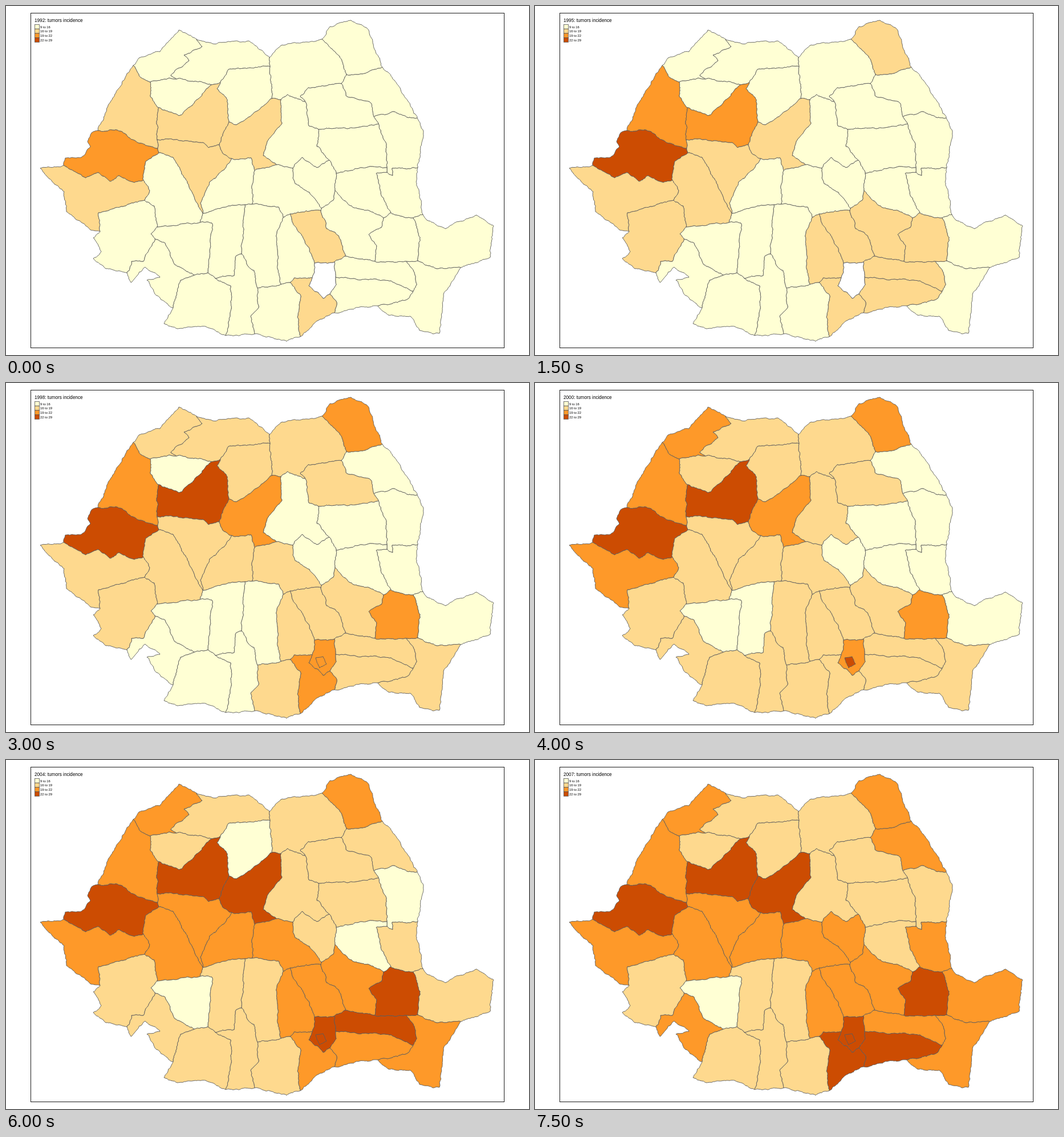
These frames come from a looping animation (917 px wide and 611 px high, 8 s). An HTML page:

```html
<!DOCTYPE html>
<html lang="en">
<head>
<meta charset="utf-8">
<title>Tumors incidence by county</title>
<style>
html, body { margin: 0; width: 100%; height: 100%; overflow: hidden; background: #fff; }
svg { display: block; width: 917px; height: 611px; }
text { font-family: "Liberation Sans", Arial, sans-serif; }
polygon { stroke: #5c5c5c; stroke-width: .9; stroke-linejoin: round; }
</style>
</head>
<body>
<svg id="map" viewBox="0 0 917 611"></svg>
<script>
const COLORS = ['#ffffd4', '#fed98e', '#fe9929', '#cc4c02'];
const LABELS = ['9 to 16', '16 to 19', '19 to 22', '22 to 29'];

// Points where counties meet; "-" is the outside.
// Two counties that share two junctions have a border between them.
const JUNCTIONS = {
  'AR TM -': '101 279', 'AR BH -': '161 218', 'BH SM -': '223 104', 'MM SM -': '334 58',
  'MM SV -': '462 90', 'BT SV -': '554 58', 'BT IS -': '660 107', 'IS VS -': '721 196',
  'GL VS -': '722 283', 'GL TL -': '731 365', 'CT TL -': '797 458', 'CL CT -': '652 525',
  'CL GR -': '576 537', 'GR TR -': '516 579', 'OT TR -': '436 574', 'DJ OT -': '385 577',
  'DJ MH -': '293 528', 'CS MH -': '212 467', 'CS TM -': '165 395',
  'BH SJ SM': '253 133', 'BH CJ SJ': '268 178', 'AB BH CJ': '265 234', 'AB AR BH': '266 249',
  'MM SJ SM': '299 128', 'CJ MM SJ': '360 138', 'BN CJ MM': '376 133', 'BN MM SV': '463 106',
  'BT IS SV': '597 120', 'IS NT SV': '588 136', 'IS NT VS': '645 194', 'BC NT VS': '653 206',
  'HR NT SV': '525 168', 'BC HR NT': '548 216', 'HR MS SV': '482 164', 'BN MS SV': '466 162',
  'BN CJ MS': '391 203', 'AB CJ MS': '374 243', 'AB MS SB': '396 267', 'BV MS SB': '436 288',
  'BV HR MS': '474 278', 'BV CV HR': '503 284', 'BC CV HR': '567 270', 'BC CV VN': '579 293',
  'BC VN VS': '668 283', 'GL VN VS': '668 291', 'BZ CV VN': '577 323', 'BV BZ CV': '553 354',
  'BV BZ PH': '552 358', 'BV DB PH': '498 364', 'AG BV DB': '486 370', 'AG BV SB': '432 347',
  'AG SB VL': '419 348', 'AB HD SB VL': '345 363', 'GJ HD VL': '340 379', 'CS GJ HD': '265 387',
  'CS HD TM': '243 340', 'AR HD TM': '241 305', 'AB AR HD': '268 257', 'BR BZ VN': '662 371',
  'BR GL VN': '675 362', 'BR GL TL': '714 371', 'CS GJ MH': '261 407', 'DJ GJ MH': '330 471',
  'DJ GJ VL': '354 467', 'DJ OT VL': '367 477', 'AG OT VL': '413 434', 'AG OT TR': '441 494',
  'AG DB TR': '482 487', 'DB GR TR': '498 484', 'DB GR IF': '537 476', 'DB IF PH': '541 450',
  'IF IL PH': '576 448', 'BZ IL PH': '595 438', 'CL IF IL': '578 475', 'CL GR IF': '568 504',
  'BR BZ IL': '647 447', 'BR CT IL': '702 447', 'BR CT TL': '722 446', 'CL CT IL': '714 499'
};

// Main bends of the borders that are not nearly straight.
const BENDS = {
  '- AR': '104 266 132 265 148 246 143 237 150 222', '- BH': '180 172 208 128',
  '- SM': '233 91 270 80 303 42', '- MM': '362 66 425 61', '- SV': '482 69',
  '- BT': '568 36 605 25 632 38', '- IS': '681 130', '- VS': '732 220', '- GL': '720 310',
  '- TL': '738 375 770 390 825 366 855 385 849 440', '- CT': '767 505 760 573 725 568 708 543 670 541',
  '- CL': '620 527', '- GR': '546 551', '- TR': '492 587', '- DJ': '350 561 300 565 277 556',
  '- MH': '264 507 247 480 270 475 244 457 219 484', '- CS': '175 460 153 442 167 430 153 406',
  '- TM': '148 392 106 360 102 325 85 312 60 284',
  'AR BH': '195 217 236 240', 'BH SM': '236 125', 'BH SJ': '253 158', 'BH CJ': '264 202',
  'MM SM': '344 71 312 86 321 96 289 122', 'SJ SM': '286 126', 'CJ SJ': '330 170 303 192',
  'BN MM': '390 111', 'BN CJ': '370 145 386 160', 'BN MS': '440 184 404 208', 'HR SV': '494 155',
  'NT SV': '516 158 530 143', 'BT SV': '585 88', 'BT IS': '630 118', 'IS NT': '596 157 640 170',
  'IS VS': '680 185 703 195', 'BC NT': '620 212', 'HR NT': '531 210', 'BC HR': '545 246',
  'BC VS': '667 248', 'CJ MS': '386 212', 'AB CJ': '355 248 345 239 285 233',
  'HR MS': '484 205 458 237 451 262', 'AB MS': '380 258', 'MS SB': '430 266',
  'CV HR': '519 265 545 283', 'BC VN': '640 281', 'GL VS': '678 297 677 284',
  'GL VN': '649 293 657 328', 'BZ VN': '588 336 606 350 638 359', 'BR GL': '692 368',
  'BV CV': '507 311 532 326', 'BZ CV': '574 340', 'BV PH': '537 358', 'AG BV': '478 352',
  'BV SB': '432 312', 'SB VL': '390 350', 'AB SB': '380 288 357 308 341 345',
  'AB HD': '293 265 318 310', 'CS HD': '260 350', 'HD TM': '252 323', 'AR HD': '245 272',
  'AR TM': '140 301 163 292 182 307 198 297 225 309', 'CS TM': '210 350 162 362',
  'CS MH': '220 447 241 447', 'CS GJ': '254 399', 'GJ MH': '279 415 296 453', 'DJ MH': '306 480',
  'GJ VL': '361 380 357 440', 'DJ OT': '394 490 395 530', 'OT VL': '400 472 402 440',
  'AG OT': '424 455 435 463', 'AG DB': '475 395 476 460', 'GR TR': '517 508 511 545',
  'OT TR': '443 528 429 543', 'DB GR': '505 476', 'DB PH': '503 380 524 412', 'DB IF': '541 466',
  'BZ PH': '562 390 583 402', 'CL IF': '579 488', 'GR IF': '531 490 556 512', 'CL GR': '579 517',
  'CT IL': '714 462 720 488', 'CL IL': '675 481', 'CL CT': '706 512', 'CT TL': '755 460',
  'BR BZ': '658 388 636 400 650 420', 'BR TL': '726 405'
};
const CITY = '543 481 556 479 562 492 550 499';

// County classes that change at the start of each year from 1992.
const CHANGES = [
  'BH1 CJ1 MS1 AB1 TM1 PH1 GR1 AR2',
  'BT1 DB1 AR3',
  'AB0 HD1 BZ1 IL1 CL1 TR1',
  'BR1 TR0 BH2 CJ2 CS1 AB1',
  'SM1 MM1 MS2 BT2 TM2 SB1 BV1 TR1 CT1 IF2 B2',
  'CT0 CJ3 SV1',
  'CT1 TM1 GR2 BR2 BN1 NT1',
  'TM2 GR1 BT1 SM2 HR1 AG1 OT2',
  'BT2 OT1 DJ1 MH1 SJ1 B3',
  'TR2 GR2 CL2 IL2 PH2 IS1 CT2 BC1',
  'CT1 SM1 CV1 VL1 BN0 SB2 DB2 BR3 IF3',
  'CT2 AB2 MS3 GL1 BZ2',
  'TL1 TR1 SM2 HD2 BV2 IL3',
  'VS1 VN1 TR2 GL2',
  'IL2 IS2 CV2 BN1 OT2',
  'TL2 TR1 MH2 CL3 GR3 OT1'
];

let seed = 7;
const random = () => (seed = seed * 16807 % 2147483647) / 2147483647;
const distance = (a, b) => Math.hypot(b[0] - a[0], b[1] - a[1]);
const points = (text = '') => (text.match(/\d+ \d+/g) || []).map(p => p.split(' ').map(Number));

// Splits a segment in halves, shifting each middle a little.
function roughen(a, b) {
  const d = distance(a, b);
  if (d < 4) return [b];
  const shift = () => (random() - .5) * Math.min(d * .28, 2.6);
  const mid = [(a[0] + b[0]) / 2 + shift(), (a[1] + b[1]) / 2 + shift()];
  return [...roughen(a, mid), ...roughen(mid, b)];
}
const ragged = path => path.slice(1).reduce((out, p, i) => out.concat(roughen(path[i], p)), [path[0]]);

function findBorders() {
  const ends = {};
  for (const key in JUNCTIONS) {
    const names = key.split(' ').sort(), [at] = points(JUNCTIONS[key]);
    names.forEach((a, i) => names.slice(i + 1).forEach(b => (ends[`${a} ${b}`] ??= []).push(at)));
  }
  return Object.entries(ends).filter(([, e]) => e.length === 2).map(([key, [a, b]]) => {
    const bends = points(BENDS[key]);
    // Bends run from the end that makes the shorter path.
    if (bends.length && distance(a, bends[0]) + distance(bends.at(-1), b) >
        distance(b, bends[0]) + distance(bends.at(-1), a)) [a, b] = [b, a];
    return { sides: key.split(' '), path: ragged([a, ...bends, b]) };
  });
}
const borders = findBorders();

// Joins a county's borders end to end.
function ring(code) {
  const parts = borders.filter(b => b.sides.includes(code)).map(b => b.path);
  const out = [...parts.shift()];
  while (parts.length) {
    const end = out.at(-1);
    const i = parts.findIndex(p => p[0] === end || p.at(-1) === end);
    if (i < 0) break;
    const [part] = parts.splice(i, 1);
    out.push(...(part[0] === end ? part : [...part].reverse()).slice(1));
  }
  return out;
}

const map = document.getElementById('map');
function add(tag, attrs, text = '') {
  const el = document.createElementNS('http://www.w3.org/2000/svg', tag);
  for (const name in attrs) el.setAttribute(name, attrs[name]);
  el.textContent = text;
  return map.appendChild(el);
}
const addCounty = path => add('polygon', { points: path.map(p => p.map(v => v.toFixed(1))).join(' ') });

add('rect', { x: 43.5, y: 12.5, width: 830, height: 586, fill: '#fff', stroke: '#1c1c1c' });
const counties = {};
for (const code of new Set(borders.flatMap(b => b.sides)))
  if (code !== '-') counties[code] = addCounty(ring(code));
const city = points(CITY);
counties.B = addCounty(ragged([...city, city[0]]));

const title = add('text', { x: 50, y: 28, 'font-size': 8.2 });
LABELS.forEach((label, i) => {
  const y = 32.5 + i * 7.7;
  add('rect', { x: 50.5, y, width: 8, height: 7.7, fill: COLORS[i], stroke: '#555', 'stroke-width': .8 });
  add('text', { x: 60, y: y + 6, 'font-size': 5.8 }, label);
});

const state = Object.fromEntries(Object.keys(counties).map(c => [c, /^(IF|B)$/.test(c) ? null : 0]));
const years = CHANGES.map(list => {
  for (const item of list.split(' ')) state[item.slice(0, -1)] = +item.at(-1);
  return { ...state };
});

let shown = -1;
function draw() {
  const step = Math.floor(performance.now() / 500) % years.length;
  if (step !== shown) {
    shown = step;
    title.textContent = `${1992 + step}: tumors incidence`;
    for (const code in counties) {
      const level = years[step][code];
      counties[code].setAttribute('fill', level === null ? '#fff' : COLORS[level]);
    }
    counties.B.style.display = years[step].B === null ? 'none' : '';
  }
  requestAnimationFrame(draw);
}
draw();
</script>
</body>
</html>
```
